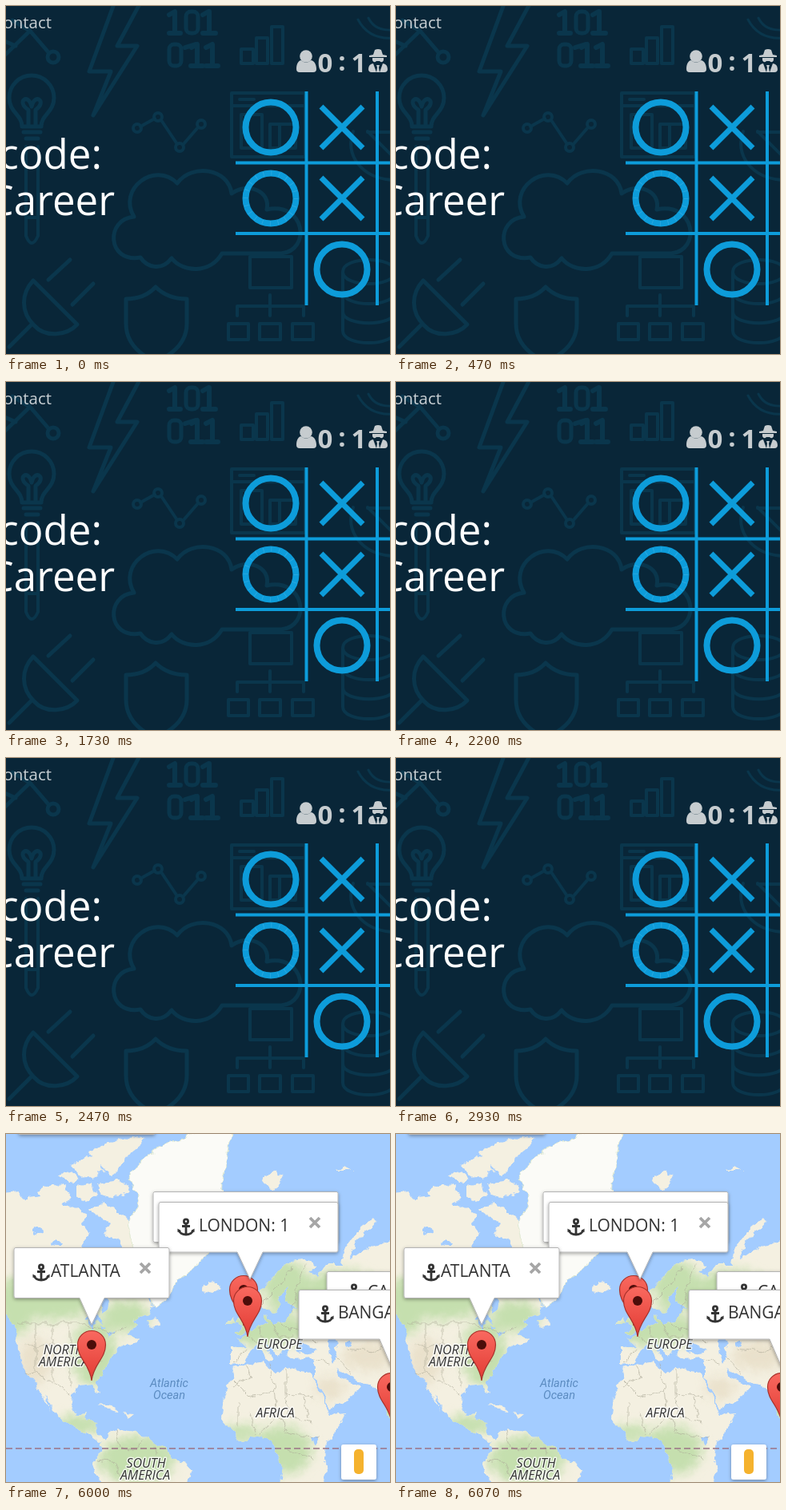
An HTML page for the animation above (8 s loop, 480 by 436 pixels).

```html
<!DOCTYPE html>
<html lang="en">
<head>
<meta charset="utf-8">
<title>Three scenes</title>
<style>
html, body { margin: 0; width: 100%; height: 100%; overflow: hidden; background: #092638; }
svg { display: block; width: 100%; height: 100%; }
text { font-family: "Open Sans", "Noto Sans", sans-serif; }
.line { fill: none; stroke-linecap: round; stroke-linejoin: round; }
.icons { stroke: #0a364c; stroke-width: 5; }
.board { fill: none; stroke: #0d9cda; }
.title { font-size: 51px; fill: #fff; text-anchor: end; }
.score { font-size: 33px; font-weight: 700; text-anchor: middle; }
.note { font-size: 23.3px; }
.place { font: italic 500 16px Roboto, sans-serif; text-anchor: middle; fill: #333; stroke: #fff; stroke-width: 3px; stroke-opacity: .75; paint-order: stroke; stroke-linejoin: round; }
.sea { font: italic 14.5px Roboto, sans-serif; text-anchor: middle; fill: #5b8bc0; }
.box { fill: #fff; stroke: #b4b4b4; }
.city { font-size: 21px; fill: #333; }
</style>
</head>
<body>
<svg viewBox="0 0 480 436" preserveAspectRatio="none">
<defs>
  <path id="cross" d="M-26-26 26 26M26-26-26 26" stroke-width="7"/>
  <circle id="ring" r="31.5" stroke-width="8"/>
  <g id="anchor" fill="none" stroke="#333" stroke-width="2.8">
    <circle cy="-7.5" r="2.6"/>
    <path d="M0-5V9M-5-1.5H5M-9 3C-8 11 8 11 9 3"/>
    <path d="M-10.500 6V1.500L-6 4.500ZM10.500 6V1.500L6 4.500Z" fill="#333" stroke="none"/>
  </g>
  <path id="close" d="M-6-6 6 6M6-6-6 6" stroke="#a6a6a6" stroke-width="3.800"/>
  <g id="pin">
    <path d="M0 0C-2-20-17.500-28-17.500-45A17.500 17.500 0 0 1 17.500-45C17.500-28 2-20 0 0Z" fill="url(#red)" stroke="#a8322b" stroke-width="1.200"/>
    <circle cy="-45" r="6" fill="#4c0d0a"/>
  </g>
  <linearGradient id="red" x2="0" y2="1"><stop stop-color="#f9695f"/><stop offset="1" stop-color="#e23b34"/></linearGradient>
  <filter id="coast" filterUnits="userSpaceOnUse" x="-20" y="-20" width="520" height="476">
    <feTurbulence type="fractalNoise" baseFrequency=".09" numOctaves="3" seed="4"/>
    <feDisplacementMap in="SourceGraphic" scale="10" xChannelSelector="R" yChannelSelector="G"/>
  </filter>
  <filter id="soft" filterUnits="userSpaceOnUse" x="-40" y="-40" width="560" height="516"><feGaussianBlur stdDeviation="7"/></filter>
  <filter id="drop" x="-20%" y="-20%" width="140%" height="150%"><feDropShadow dx="0" dy="1.500" stdDeviation="2" flood-opacity=".35"/></filter>
  <clipPath id="ground"><use href="#land"/></clipPath>
  <path id="land" d="M-8 78 8 72 22 80 42 77 62 86 84 92 100 100 96 112 104 124 96 136 92 160 90 190 104 206 116 210 120 226 126 222 128 204 140 190 146 170 160 182 172 198 184 214 178 226 158 234 166 240 150 250 166 256 158 264 148 262 136 274 128 288 120 300 113 312 117 328 111 322 106 315 92 317 85 324 82 340 88 352 101 347 98 359 113 363 114 377 127 383 118 387 104 377 84 365 68 357 58 342 47 326 55 346 44 328 36 310 22 292 15 270 14 244-8 216Z
    M118 390 126 378 140 369 160 372 174 379 187 389 198 394 206 404 224 411 233 421 226 444H122L111 424 108 413 116 403Z
    M281 289 281 268 300 267 288 256 304 250 316 240 326 236 322 226 328 228 331 238 350 234 356 224 366 216 352 214 350 204 353 190 344 204 340 216 336 226 328 222 314 212 318 198 336 176 356 158 372 156 388 166 380 173 390 178 400 164 420 164 440 150 460 140 490 132V362L480 358 468 322 455 313 440 311 424 300 412 295 428 311 442 317 428 334 404 344 396 326 386 304 386 290 384 281 360 283 350 276 354 270 344 270 340 281 332 268 322 262 331 276 334 284 328 286 322 272 312 265 306 272 298 287Z
    M284 293 300 289 322 285 326 293 340 299 350 293 368 297 382 299 388 314 396 334 405 350 424 348 418 366 401 386 398 404 402 420 392 444H342L346 420 338 400 332 384 318 378 294 384 278 368 269 350 272 330 282 306Z
    M286 236 293 228 288 216 296 212 301 226 307 238 300 248 286 250 294 241ZM276 240 284 228 285 240Z
    M247 188 262 186 269 193 258 199 246 196Z
    M104 95 124 86 138 98 150 108 164 126 168 146 150 150 140 132 122 124 130 112Z
    M38 72 58 62 76 68 82 82 66 88 46 84ZM66 52 82 46 92 56 82 62ZM88 66 106 62 114 76 100 84 88 78Z
    M82 40 100 26 116 30 122 46 106 58 92 50ZM104 22 128 12 152 4 176 8 158 22 146 38 132 52 118 38ZM112 62 142 58 156 70 138 80 118 76Z
    M176 234 188 230 192 240 180 242ZM116 338 132 340 142 348 128 344ZM146 350 160 351 154 356Z
    M420 164 424 142 438 122 456 106 464 110 446 126 432 146 430 166Z M320 56 334 46 346 52 340 64 330 70Z M410 46 426 40 432 46Z"/>
</defs>

<g class="scene">
  <rect width="480" height="436" fill="#092638"/>
  <g class="line icons">
    <path d="M-4 64 30 31 53 58M30 31 8 18M-4 43 12 50"/><circle cx="59" cy="64" r="7"/>
    <path d="M137-8 104 82H131L109 137 164 50H139L170-8"/>
    <path d="M204 11 211 7V34M204 34H218M246 11 253 7M254 7V34M246 34H262M224 52 237 48M232 52 239 48V75M231 75H246M250 52 258 48V75M250 75H265" stroke-width="6"/>
    <rect x="225" y="7" width="15" height="27" rx="6"/><rect x="204" y="48" width="15" height="27" rx="6"/>
    <path d="M294 54H309V72H294ZM313 40H327V72H313ZM332 26H346V72H332Z" stroke-width="4"/>
    <path d="M20 151C20 136 4 133 4 115A28 28 0 0 1 60 115C60 133 44 136 44 151ZM22 158H43M25 166H40M28 149V130C12 120 28 108 32 126C36 108 52 120 37 130V149"/>
    <path d="M25 176V288Q32 306 40 288V176M25 265H40" stroke-width="4"/>
    <path d="M168 151 186 141M194 143 214 173M221 174 240 152" stroke-width="4"/>
    <g stroke-width="4"><circle cx="164" cy="153" r="5"/><circle cx="190" cy="139" r="5"/><circle cx="217" cy="177" r="5"/><circle cx="244" cy="148" r="5"/></g>
    <path d="M282 109H374V189H282ZM282 125H374M292 117H310M294 136H320V178H294ZM330 148H362V178H330ZM342 148V178" stroke-width="4"/>
    <path d="M168 315C126 322 124 267 160 264C139 229 186 194 214 222C232 197 278 203 282 235C303 220 331 232 326 255C374 245 382 306 344 310H270C255 336 221 334 207 316C194 333 176 327 168 315Z"/>
    <path d="M187 352C176 364 162 367 150 367V398C150 424 170 438 187 446C205 438 226 424 226 398V367C211 367 198 363 187 352Z"/>
    <path d="M34 344 89 399C76 413 49 416 35 400C18 383 19 360 34 344ZM53 343 80 318M83 374 109 348M31 400 4 427"/>
    <path d="M305 314H357V353H305ZM330 362V376M289 388V376H372V388M330 376V388M278 398H303V418H278ZM317 398H343V418H317ZM358 398H384V418H358Z" stroke-width="4"/>
    <path d="M421 333C421 313 486 313 486 333M421 333C421 353 486 353 486 333M421 333V407C421 427 486 427 486 407M421 358C421 378 486 378 486 358M421 383C421 402 486 402 486 383" stroke-width="4"/>
    <path d="M440 17C449 34 465 42 486 40M453 15C459 27 469 31 486 30" stroke-width="3"/>
    <path d="M484 218C444 216 423 186 434 157M452 157 484 189M484 158H452" stroke-width="4"/>
  </g>
  <text x="57" y="28" font-size="20.5" text-anchor="end" fill="#c9d0d4">Contact</text>
  <text class="title" x="120" y="204">code:</text>
  <text class="title" x="136" y="262">Career</text>
  <g fill="#c6cccf">
    <circle cx="375" cy="63" r="7.800"/>
    <path d="M363 79C363 72 366 68 369 68Q375 74 381 68C385 68 388 73 388 79Q388 83 384 83H367Q363 83 363 79Z"/>
    <text class="score" x="399" y="83">0</text>
    <text class="score" x="420" y="81">:</text>
    <text class="score" x="441" y="83">1</text>
    <path d="M459 61 461 55Q465 53 469 55L471 61 476 62V64H454V62ZM458 65H472V68Q470 72 467 69H463Q460 72 458 68ZM453 79Q453 73 459 72L463 83H457Q453 83 453 79ZM477 79Q477 73 471 72L467 83H473Q477 83 477 79ZM463 74H467L466 77 467 83H463L464 77Z"/>
  </g>
  <g class="board">
    <path d="M375.500 107V375M464 107V375M287 196.500H480M287 285H480" stroke-width="4"/>
    <use href="#ring" x="331" y="152"/><use href="#ring" x="331" y="241"/><use href="#ring" x="420" y="330"/>
    <circle cx="331" cy="241" r="31.500" stroke="#45b4e5" stroke-width="6" stroke-dasharray="1 8.900" opacity=".5"/>
    <use href="#cross" x="420" y="152"/><use href="#cross" x="420" y="241"/><use href="#cross" x="509" y="330"/>
  </g>
</g>

<g class="scene">
  <rect width="480" height="436" fill="#5edbfb"/>
  <g fill="#0b2c42">
    <text x="73" y="34" font-size="31">DOMVEK ONLY</text>
    <rect x="73" y="37" width="220" height="2"/>
    <text class="note" x="73" y="73">Call Tavindola, C U Later, Bye!</text>
    <text class="note" x="73" y="435">Swipe Microphone to Exit!!!</text>
  </g>
  <g fill="#fff">
    <rect x="172" y="90" width="111" height="201" rx="55.500"/>
    <path class="line" d="M138.500 212.500V233A89 89 0 0 0 316.500 233V212.500" stroke="#fff" stroke-width="22.500"/>
    <rect x="216" y="325" width="23" height="40"/>
    <rect x="161" y="357" width="133" height="22" rx="11"/>
  </g>
</g>

<g class="scene">
  <rect width="480" height="436" fill="#a3ccff"/>
  <g filter="url(#coast)">
    <use href="#land" fill="#f4f0e1"/>
    <g clip-path="url(#ground)">
      <g filter="url(#soft)" fill="#c5dfae">
        <ellipse cx="50" cy="205" rx="70" ry="28"/><ellipse cx="110" cy="275" rx="28" ry="42"/>
        <ellipse cx="150" cy="228" rx="30" ry="20"/><ellipse cx="10" cy="235" rx="20" ry="18"/>
        <ellipse cx="92" cy="364" rx="30" ry="12"/><ellipse cx="164" cy="408" rx="48" ry="30"/>
        <ellipse cx="325" cy="245" rx="50" ry="22"/><ellipse cx="350" cy="190" rx="30" ry="32"/>
        <ellipse cx="420" cy="205" rx="55" ry="35"/><ellipse cx="345" cy="396" rx="38" ry="30"/>
        <ellipse cx="292" cy="374" rx="24" ry="10"/><ellipse cx="478" cy="345" rx="14" ry="18"/>
      </g>
      <g filter="url(#soft)" fill="#e6dcc4" opacity=".75">
        <ellipse cx="36" cy="285" rx="20" ry="30"/><ellipse cx="454" cy="278" rx="34" ry="18"/><ellipse cx="405" cy="318" rx="18" ry="14"/>
      </g>
    </g>
    <path d="M152 58 168 32 196 14 224 4 252-8H282L276 30 270 62 268 100 256 144 238 166 215 183 205 199 194 212 186 217 178 196 166 170 158 138 152 110 164 92 166 76Z" fill="#fbfbf7" stroke="#dfe9d1"/>
    <g fill="#a3ccff">
      <path d="M98 232 112 225 122 236 112 234 108 246 104 234ZM116 239 126 242 118 246ZM128 250 138 246 130 254Z"/>
      <path d="M359 270 368 260 378 265 390 273 372 276ZM402 260 410 256 416 262 409 269 415 282 408 286 404 274Z"/>
      <ellipse cx="386" cy="384" rx="4" ry="5"/><ellipse cx="371" cy="207" rx="4" ry="3"/>
      <ellipse cx="40" cy="122" rx="7" ry="4"/><ellipse cx="64" cy="137" rx="8" ry="3"/><ellipse cx="429" cy="263" rx="4" ry="3"/>
    </g>
    <g class="line" stroke="#aaa796" stroke-width=".8" opacity=".75">
      <path d="M14 237H96L110 242 132 250 150 242M25 298 44 302 66 316 82 328M37 237V300M58 237V308M80 237V316M24 265H116M45 285H118"/>
      <path d="M286 286 300 269M305 252 315 264M319 240 322 262 338 260M332 238 340 254 358 254M346 236 354 244 374 248 386 260M316 216 342 190 358 166M358 224 362 196 374 164M385 282 404 286M416 283 428 294 430 302M428 268 458 273 480 263"/>
      <path d="M284 308 306 330 336 322 328 289M350 295V326L386 330M336 322 340 350 318 374M350 326 352 354 382 362M290 338V366M304 348 312 376M340 350 350 374 392 382M352 396 384 408M372 330 377 356M300 290 306 304 284 316"/>
      <path d="M138 370 142 392 160 396M160 396 172 382M116 408 138 412 146 434M184 390 190 404"/>
    </g>
  </g>
  <path d="M0 394H480" stroke="#9c7385" stroke-width="1.500" stroke-dasharray="8 4"/>
  <g class="place">
    <text x="72" y="276">NORTH</text><text x="72" y="291">AMERICA</text>
    <text x="342" y="269">EUROPE</text><text x="336.500" y="355">AFRICA</text>
    <text x="175" y="418">SOUTH</text><text x="174" y="433">AMERICA</text>
  </g>
  <text class="sea" x="204" y="317">Atlantic</text><text class="sea" x="204" y="332">Ocean</text>

  <use href="#pin" x="297" y="240"/><use href="#pin" x="302" y="254"/>
  <use href="#pin" x="107" y="309"/><use href="#pin" x="482" y="362"/>

  <rect class="box" x="16" y="-20" width="170" height="20.500" rx="2" filter="url(#drop)"/>
  <rect class="box" x="184" y="72.500" width="231" height="63" rx="2" filter="url(#drop)"/>
  <g filter="url(#drop)">
    <path class="box" d="M193 85.500H413Q415 85.500 415 88V146Q415 148 413 148H321L305 182 289 148H193Q191 148 191 146V88Q191 85.500 193 85.500Z"/>
  </g>
  <use href="#anchor" x="225" y="117"/>
  <text class="city" x="241" y="122">LONDON: 1</text>
  <use href="#close" x="386" y="111"/>

  <g filter="url(#drop)">
    <path class="box" d="M12 142.500H202Q204 142.500 204 145V203Q204 205.500 202 205.500H123L107 239 92 205.500H12Q10 205.500 10 203V145Q10 142.500 12 142.500Z"/>
  </g>
  <use href="#anchor" x="44" y="174"/>
  <text class="city" x="56" y="179">ATLANTA</text>
  <use href="#close" x="174" y="168"/>

  <rect class="box" x="401" y="172.500" width="100" height="63" rx="2" filter="url(#drop)"/>
  <use href="#anchor" x="435" y="199"/>
  <text class="city" x="452" y="205">CAL</text>
  <g filter="url(#drop)">
    <path class="box" d="M368 195.500H520V257H499L482 292 467 257H368Q366 257 366 255V198Q366 195.500 368 195.500Z"/>
  </g>
  <use href="#anchor" x="399" y="226"/>
  <text class="city" x="415" y="231">BANGALORE</text>

  <rect x="419" y="389" width="44" height="44" rx="3" fill="#fff" filter="url(#drop)"/>
  <rect x="435" y="395" width="12" height="31" rx="5" fill="#f5b22d"/>
</g>
</svg>
<script>
const LOOP = 8000;
const cuts = [0, 3000, 6000, LOOP];

document.querySelectorAll(".scene").forEach((scene, i) => {
  const from = cuts[i] / LOOP, to = cuts[i + 1] / LOOP;
  const steps = [
    { offset: 0, visibility: from ? "hidden" : "visible" },
    { offset: from, visibility: "visible" },
    { offset: to, visibility: to < 1 ? "hidden" : "visible" },
    { offset: 1, visibility: to < 1 ? "hidden" : "visible" }
  ].map(step => ({ ...step, easing: "step-end" }));
  scene.animate(steps, { duration: LOOP, iterations: Infinity }).startTime = 0;
});
</script>
</body>
</html>
```
